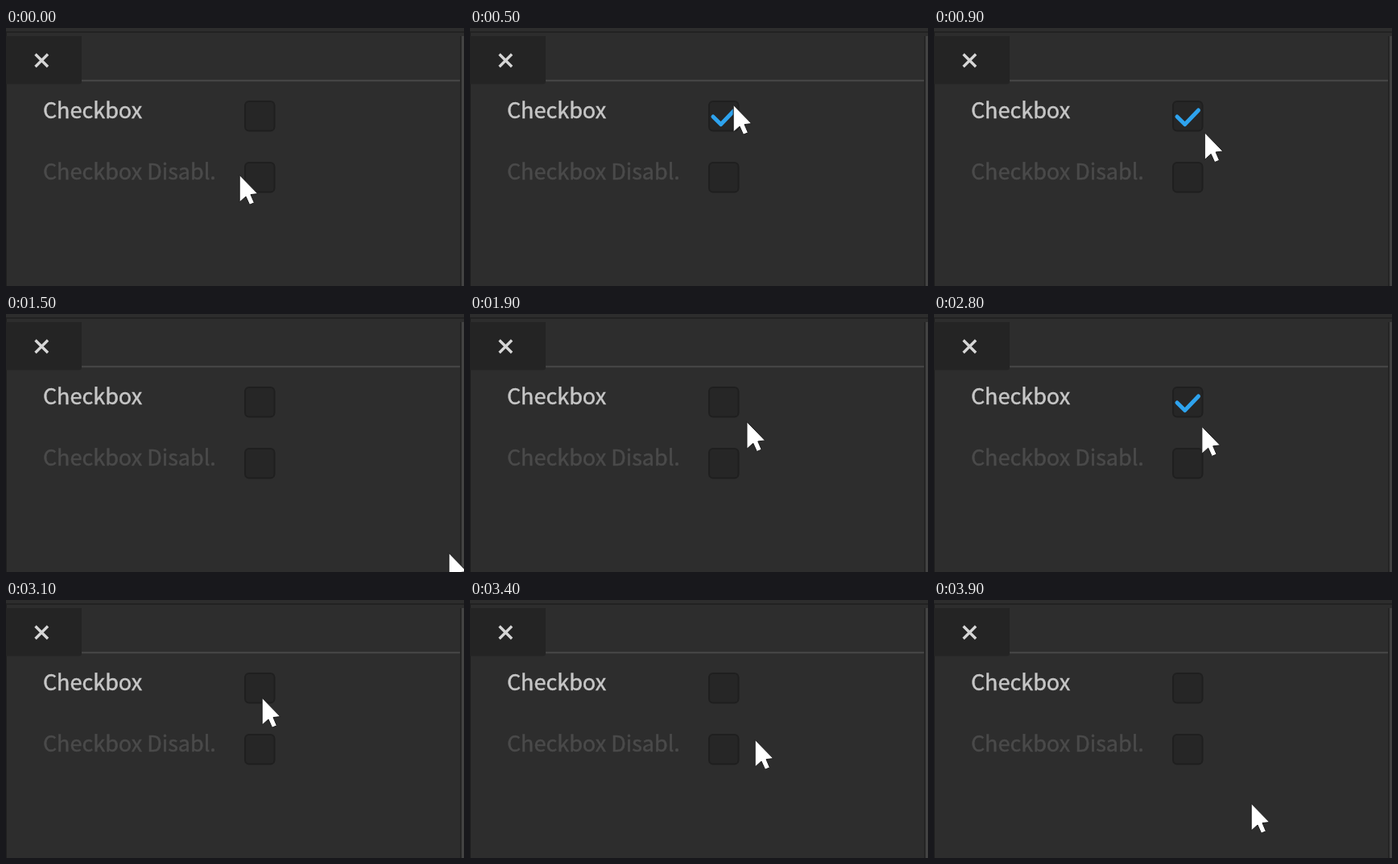
Write an HTML page that moves like this. It is 569 px wide and 320 px high and loops after 4000 ms.

```html
<!DOCTYPE html>
<html lang="en">
<head>
<meta charset="utf-8">
<title>Checkbox</title>
<style>
  html, body { margin: 0; width: 100%; height: 100%; overflow: hidden; background: #2d2d2d; }
  svg { display: block; width: 569px; height: 320px; }
  text {
    font: 27px "Noto Sans CJK SC", "Noto Sans CJK JP", "Noto Sans CJK", "Noto Sans", sans-serif;
    fill: currentColor; stroke: currentColor; stroke-width: .5;
  }
  .soft { filter: blur(.6px); }
  .box { fill: #262626; stroke: #1f1f1f; stroke-width: 2; }
</style>
</head>
<body>
<svg viewBox="0 0 569 320">
  <rect width="569" height="320" fill="#2d2d2d"/>
  <path d="M0 5H569" stroke="#1f1f1f" stroke-width="1.6"/>
  <path d="M.5 5V320" stroke="#202020"/>
  <path d="M94 65.3H564" stroke="#474747" stroke-width="2"/>
  <path d="M565 10V320" stroke="#232323" stroke-width="1.6"/>
  <path d="M567.5 10V320" stroke="#434343" stroke-width="3"/>
  <path d="M0 10H94V66.5Q94 69.5 91 69.5H0Z" fill="#242424"/>

  <g class="soft">
    <path d="M36.5 32.5L52 48M52 32.5L36.5 48" stroke="#d6d6d6" stroke-width="3.4"/>
    <text x="45.9" y="112" color="#c6c6c6">Checkbox</text>
    <text x="45.9" y="188" color="#4a4a4a">Checkbox Disabl.</text>
    <rect class="box" x="297" y="91" width="36.5" height="36.5" rx="5"/>
    <rect class="box" x="297" y="167" width="36.5" height="36.5" rx="5"/>
    <path id="check" d="M302 110L311.7 119.5L328.5 102" fill="none" stroke="#2ea3ee"
          stroke-width="5" stroke-linecap="round" stroke-linejoin="round"/>
  </g>
  <path id="cursor" d="M-.8 -.6V33L7 26L11.6 36.2L17.4 33.8L13 23.6L21.8 22.6Z"
        fill="#fff" stroke="#1c1c1c" stroke-linejoin="round"/>
</svg>
<script>
  const LOOP = 4000, STEP = 100;

  // The pointer eases to each place in turn and rests there until the next move.
  const home = { x: 291, y: 183 };
  const moves = [
    { from: 0, until: 500, x: 328, y: 96 },
    { from: 500, until: 700, x: 341, y: 147 },
    { from: 800, until: 1100, x: 334, y: 117 },
    { from: 1300, until: 1500, x: 551, y: 297 },
    { from: 1500, until: 2100, x: 319, y: 114 },
    { from: 2300, until: 2500, x: 352, y: 163 },
    { from: 2700, until: 3000, x: 319, y: 122 },
    { from: 3100, until: 3400, x: 355, y: 174 },
    { from: 3800, until: 3900, x: 395, y: 253 }
  ];
  const clicks = [400, 1300, 2200, 3100];

  const check = document.getElementById("check");
  const cursor = document.getElementById("cursor");
  const easeOut = k => 1 - (1 - k) ** 2;

  function pointerAt(t) {
    let { x, y } = home;
    for (const move of moves) {
      if (t <= move.from) break;
      const k = easeOut(Math.min(1, (t - move.from) / (move.until - move.from)));
      x += (move.x - x) * k;
      y += (move.y - y) * k;
    }
    return [x, y];
  }

  function draw(now) {
    const t = Math.floor((now % LOOP) / STEP) * STEP;
    const checked = clicks.filter(click => click <= t).length % 2 === 1;
    check.setAttribute("visibility", checked ? "visible" : "hidden");
    cursor.setAttribute("transform", `translate(${pointerAt(t)})`);
  }

  let start;
  function tick(now) {
    start ??= now;
    draw(now - start);
    requestAnimationFrame(tick);
  }
  draw(0);
  requestAnimationFrame(tick);
</script>
</body>
</html>
```
